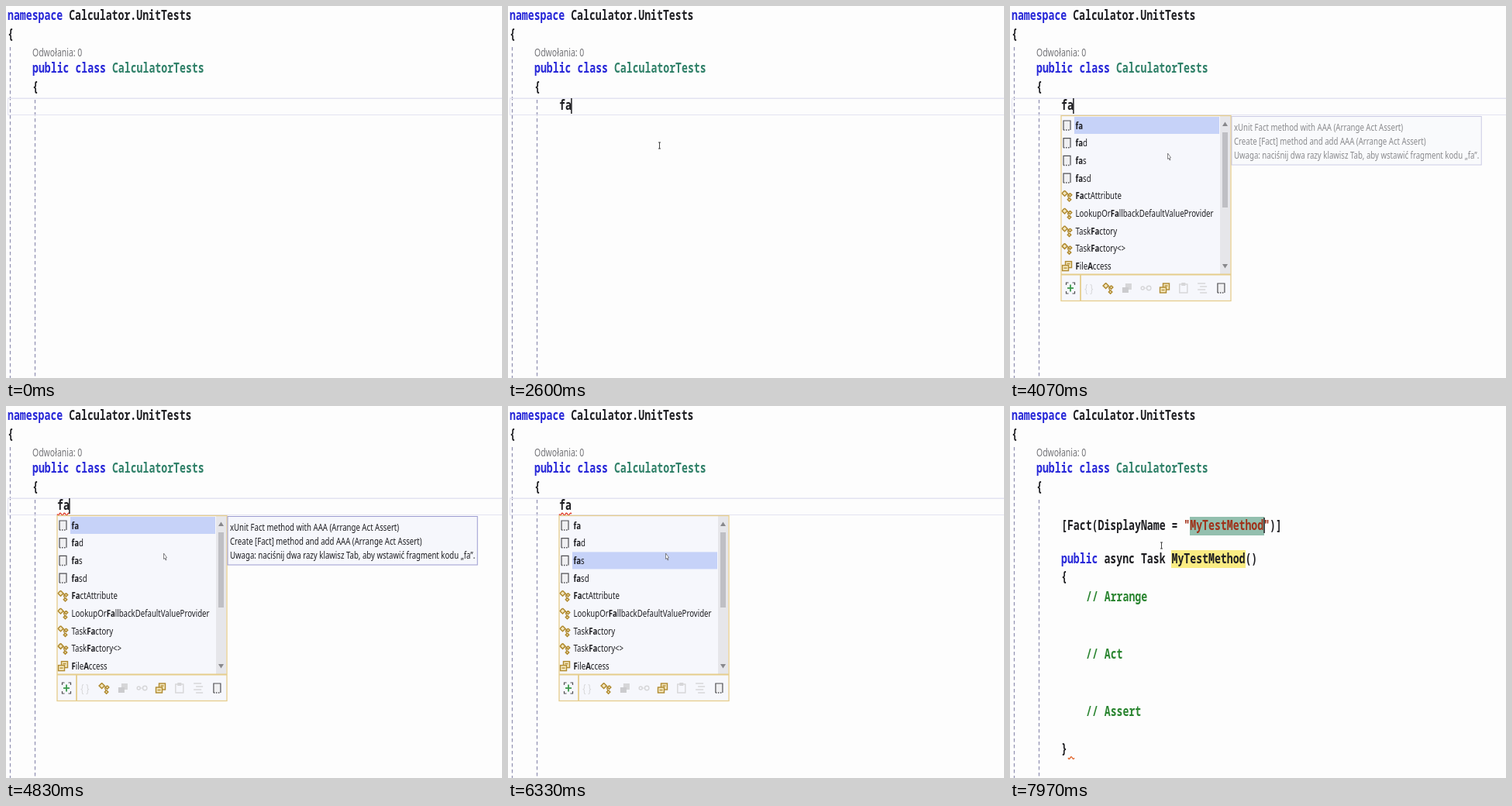
Write an HTML page with a canvas that moves like this. It is 640 by 480 pixels and loops after 8000 ms.

```html
<!DOCTYPE html>
<html lang="pl">
<head>
<meta charset="utf-8">
<style>
  html, body { margin: 0; width: 100%; height: 100%; overflow: hidden; background: #fdfdfd; }
  canvas { display: block; }
</style>
</head>
<body>
<canvas id="stage" width="640" height="480"></canvas>
<script>
const ctx = document.getElementById('stage').getContext('2d');
const LOOP = 8000;
const SQUASH = 0.776; // the whole screen is shown narrower than it was
const MONO = '600 17px "Noto Sans Mono", monospace';
const ui = (size, weight = 500) => `${weight} ${size}px "Noto Sans", "Open Sans", sans-serif`;
const UI_SIZE = 12.4;

const INK = '#1e1e22', BLUE = '#2626d8', GREEN = '#2f8068', COMMENT = '#2a8530', RED = '#a03018';
const PAPER = '#fdfdfd', PANEL = '#f6f7fc', CURRENT_LINE = '#e3e3f1', GUIDE = '#9494b4';
const GOLD = '#e6cd8c', ICON = '#b08a30', ICON_FILL = '#f3e6bc', FAINT = '#d6d6d8', GRAY = '#505054';

const TIMES = { typeF: 2400, typeA: 2530, popup: 3100, squiggle: 4600, firstTab: 7600, snippet: 7720 };
const SELECTIONS = [
  { at: 3100, tipAt: 3950, name: 'fa', async: '', display: '' },
  { at: 5270, tipAt: 5750, name: 'fad', async: '', display: 'DisplayName and ' },
  { at: 6260, tipAt: 6740, name: 'fas', async: 'async ', display: '' },
  { at: 6650, tipAt: 7130, name: 'fasd', async: 'async ', display: 'DisplayName and ' },
];
// Asterisks surround the matched letters.
const ITEMS = ['*fa*', '*fa*d', '*fa*s', '*fa*sd', '*Fa*ctAttribute', 'LookupOr*Fa*llbackDefaultValueProvider',
  'Task*Fa*ctory', 'Task*Fa*ctory<>', '*F*ile*A*ccess'];
const rowY = i => 154 + 22.7 * i;

const clamp = v => Math.max(0, Math.min(1, v));

function rect(x, y, w, h, fill) {
  ctx.fillStyle = fill;
  ctx.fillRect(x, y, w, h);
}

function frame(x, y, w, h, color, width = 1) {
  ctx.strokeStyle = color;
  ctx.lineWidth = width;
  ctx.strokeRect(x, y, w, h);
}

function line(points, color, width = 1, dash = []) {
  ctx.strokeStyle = color;
  ctx.lineWidth = width;
  ctx.setLineDash(dash);
  ctx.beginPath();
  points.forEach(([x, y]) => ctx.lineTo(x, y));
  ctx.stroke();
  ctx.setLineDash([]);
}

function polygon(points, color) {
  ctx.fillStyle = color;
  ctx.beginPath();
  points.forEach(([x, y]) => ctx.lineTo(x, y));
  ctx.fill();
}

function textWidth(str, font) {
  ctx.font = font;
  return ctx.measureText(str).width * SQUASH;
}

function text(str, x, y, font, color) {
  ctx.save();
  ctx.font = font;
  ctx.fillStyle = color;
  ctx.translate(x, y);
  ctx.scale(SQUASH, 1);
  ctx.fillText(str, 0, 0);
  ctx.restore();
  return x + textWidth(str, font);
}

// Draws [text, color] runs one after another.
function code(x, y, ...runs) {
  for (const [str, color = INK] of runs) x = text(str, x, y, MONO, color);
}

function wave(x, y, width, color) {
  const points = [];
  for (let d = 0; d <= width; d++) points.push([x + d, y + 1.5 * Math.sin(d * Math.PI / 2.7)]);
  line(points, color, 1.3);
}

const icons = {
  snippet(x, y) {
    rect(x - 4.5, y - 6, 9, 12, '#f0f0f2');
    line([[x - 4.5, y + 6], [x - 4.5, y - 6], [x + 4.5, y - 6], [x + 4.5, y + 6]], GRAY, 1.2);
    line([[x - 4.5, y + 6], [x + 4.5, y + 6]], GRAY, 1.5, [1.5, 1.5]);
  },
  class(x, y) {
    const diamond = (cx, cy, r) => {
      const points = [[cx, cy - r], [cx + r, cy], [cx, cy + r], [cx - r, cy], [cx, cy - r]];
      polygon(points, ICON_FILL);
      line(points, ICON, 1.5);
    };
    line([[x - 2, y - 3], [x + 4, y - 1], [x + 1, y], [x + 3, y + 5]], ICON, 1.3);
    diamond(x - 3, y - 3, 3.5);
    diamond(x + 4, y - 1, 2.2);
    diamond(x + 3, y + 5, 2.2);
  },
  enum(x, y) {
    rect(x - 2, y - 6, 8, 8, ICON_FILL);
    frame(x - 2, y - 6, 8, 8, ICON, 1.4);
    rect(x - 6, y - 1, 8, 7, ICON_FILL);
    frame(x - 6, y - 1, 8, 7, ICON, 1.4);
    line([[x - 4, y + 2.5], [x, y + 2.5]], ICON, 1.3);
    line([[x, y - 3], [x + 4, y - 3]], ICON, 1.3);
  },
  struct(x, y) {
    rect(x - 2, y - 6, 8, 8, FAINT);
    rect(x - 6, y - 1, 8, 7, '#cbcbce');
  },
  braces(x, y) {
    text('{ }', x - 6, y + 5, ui(14), FAINT);
  },
  interface(x, y) {
    ctx.strokeStyle = FAINT;
    ctx.lineWidth = 1.4;
    for (const [dx, r] of [[-4, 2], [4, 2.7]]) {
      ctx.beginPath();
      ctx.arc(x + dx, y, r, 0, 7);
      ctx.stroke();
    }
    line([[x - 2, y], [x + 1, y]], FAINT);
  },
  clipboard(x, y) {
    frame(x - 5, y - 5, 10, 11, FAINT, 1.4);
    rect(x - 2.5, y - 7, 5, 4, FAINT);
  },
  lines(x, y) {
    [-6, -2, 2, 6].forEach((dy, i) => rect(x - 6 + i % 2 * 3, y + dy - .7, i % 2 ? 9 : 10, 1.4, FAINT));
  },
  expand(x, y) {
    for (const sx of [-1, 1]) for (const sy of [-1, 1])
      line([[x + sx * 2.5, y + sy * 7], [x + sx * 5.5, y + sy * 7], [x + sx * 5.5, y + sy * 4]], GRAY, 1.2);
    line([[x - 4, y], [x + 4, y]], '#3d9a4d', 1.8);
    line([[x, y - 4.5], [x, y + 4.5]], '#3d9a4d', 1.8);
  },
};
const TOOLBAR = ['expand', 'braces', 'class', 'struct', 'interface', 'enum', 'clipboard', 'lines', 'snippet'];

function drawPopup(selected) {
  rect(66, 141, 219, 240, PANEL);
  rect(83, rowY(selected) - 11, 187, 22, '#c6d2f8');
  ITEMS.forEach((item, i) => {
    const y = rowY(i);
    icons[i < 4 ? 'snippet' : i < 8 ? 'class' : 'enum'](73.5, y);
    let x = 84.5;
    item.split('*').forEach((part, k) => {
      x = text(part, x, y + 4.5, ui(UI_SIZE, k % 2 ? 700 : 500), INK);
    });
  });

  rect(271, 142, 13, 204, '#e6e6ea');
  rect(274, 163, 7, 97, '#bfbfc4');
  polygon([[274, 155], [281, 155], [277.5, 149.5]], '#88888c');
  polygon([[274, 333], [281, 333], [277.5, 338.5]], '#88888c');

  frame(66, 141.5, 219, 239, GOLD, 1.3);
  line([[66, 346.5], [285, 346.5]], GOLD, 1.8);
  line([[91, 346.5], [91, 381]], GOLD, 1.8);
  TOOLBAR.forEach((name, i) => icons[name](78 + i * 24.3, 364));
}

function drawTip({ name, async, display }, row, alpha) {
  const lines = [
    `xUnit Fact ${async}method with ${display}AAA (Arrange Act Assert)`,
    `Create [Fact] ${async}method ${display ? 'with ' + display : 'and '}add AAA (Arrange Act Assert)`,
    `Uwaga: naciśnij dwa razy klawisz Tab, aby wstawić fragment kodu „${name}”.`,
  ];
  const font = ui(UI_SIZE), top = rowY(row) - 11.5;
  const width = Math.max(...lines.map(l => textWidth(l, font))) + 6;
  ctx.globalAlpha = alpha;
  rect(286, top, width, 62.5, PANEL);
  frame(286, top, width, 62.5, '#9c9cd0');
  lines.forEach((l, i) => text(l, 289, top + 18 + i * 18, font, INK));
  ctx.globalAlpha = 1;
}

function drawCaret(x, y, t) {
  const typing = t >= TIMES.typeF && t < TIMES.typeA;
  if (typing || (t + 640) % 1060 < 530) rect(x - .7, y, 1.5, 20, INK);
}

function drawSnippet(t) {
  rect(232, 143, 96, 24, '#93bfae');
  rect(208, 186, 96, 23, '#faec83');
  code(66, 160, ['[Fact(DisplayName = '], ['"MyTestMethod"', RED], [')]']);
  code(66, 203, ['public', BLUE], [' async Task MyTestMethod()']);
  code(66, 226, ['{']);
  ['Arrange', 'Act', 'Assert'].forEach((step, i) => code(98, 252 + 74 * i, ['// ' + step, COMMENT]));
  code(66, 448, ['}']);
  wave(75, 454, 8, '#e0642a');
  drawCaret(328, 144, t);
}

function drawTyped(t) {
  rect(2, 118.5, 638, 1.5, CURRENT_LINE);
  rect(2, 140, 638, 1, CURRENT_LINE);
  rect(2, 119, 1, 21, CURRENT_LINE);
  const typed = t < TIMES.typeF ? '' : t < TIMES.typeA ? 'f' : t < TIMES.firstTab ? 'fa' : 'fasd';
  code(66, 134, [typed]);
  if (t >= TIMES.squiggle) wave(66, 139.5, 16, '#e03a2a');
  drawCaret(66 + textWidth(typed, MONO), 119, t);
}

function drawPointer(t, overPopup) {
  if (overPopup) {
    const shape = [[203.5, 190], [203.5, 197.5], [205, 196.2], [206, 199], [207, 198.5], [206, 196], [207.5, 195.6], [203.5, 190]];
    polygon(shape, '#fff');
    line(shape, '#66666a', .8);
    return;
  }
  if (t < 30) return;
  const left = (1 - clamp((t - 30) / 770)) ** 3;
  const x = 195.5 + 445 * left, y = 180 + 120 * left;
  rect(x - .5, y - 4, 1, 8, '#444');
  rect(x - 1.5, y - 4.5, 3, 1, '#444');
  rect(x - 1.5, y + 3.5, 3, 1, '#444');
}

function draw(t) {
  rect(0, 0, 640, 480, PAPER);
  line([[5.5, 53], [5.5, 480]], GUIDE, 1.3, [4.5, 3.5]);
  line([[37.5, 121], [37.5, 480]], GUIDE, 1.3, [4.5, 3.5]);
  code(2, 18, ['namespace', BLUE], [' Calculator.UnitTests']);
  code(2, 42, ['{']);
  text('Odwołania: 0', 34, 65, ui(13.5), '#747478');
  code(34, 86, ['public class ', BLUE], ['CalculatorTests', GREEN]);
  code(34, 110, ['{']);

  if (t < TIMES.snippet) drawTyped(t);
  else drawSnippet(t);

  const open = t >= TIMES.popup && t < TIMES.firstTab;
  if (open) {
    const row = SELECTIONS.filter(s => t >= s.at).length - 1;
    drawPopup(row);
    const alpha = clamp((t - SELECTIONS[row].tipAt) / 240);
    if (alpha > 0) drawTip(SELECTIONS[row], row, alpha);
  }
  drawPointer(t, open);
}

const start = performance.now();
function tick() {
  draw((performance.now() - start) % LOOP);
  requestAnimationFrame(tick);
}
tick();
</script>
</body>
</html>
```
